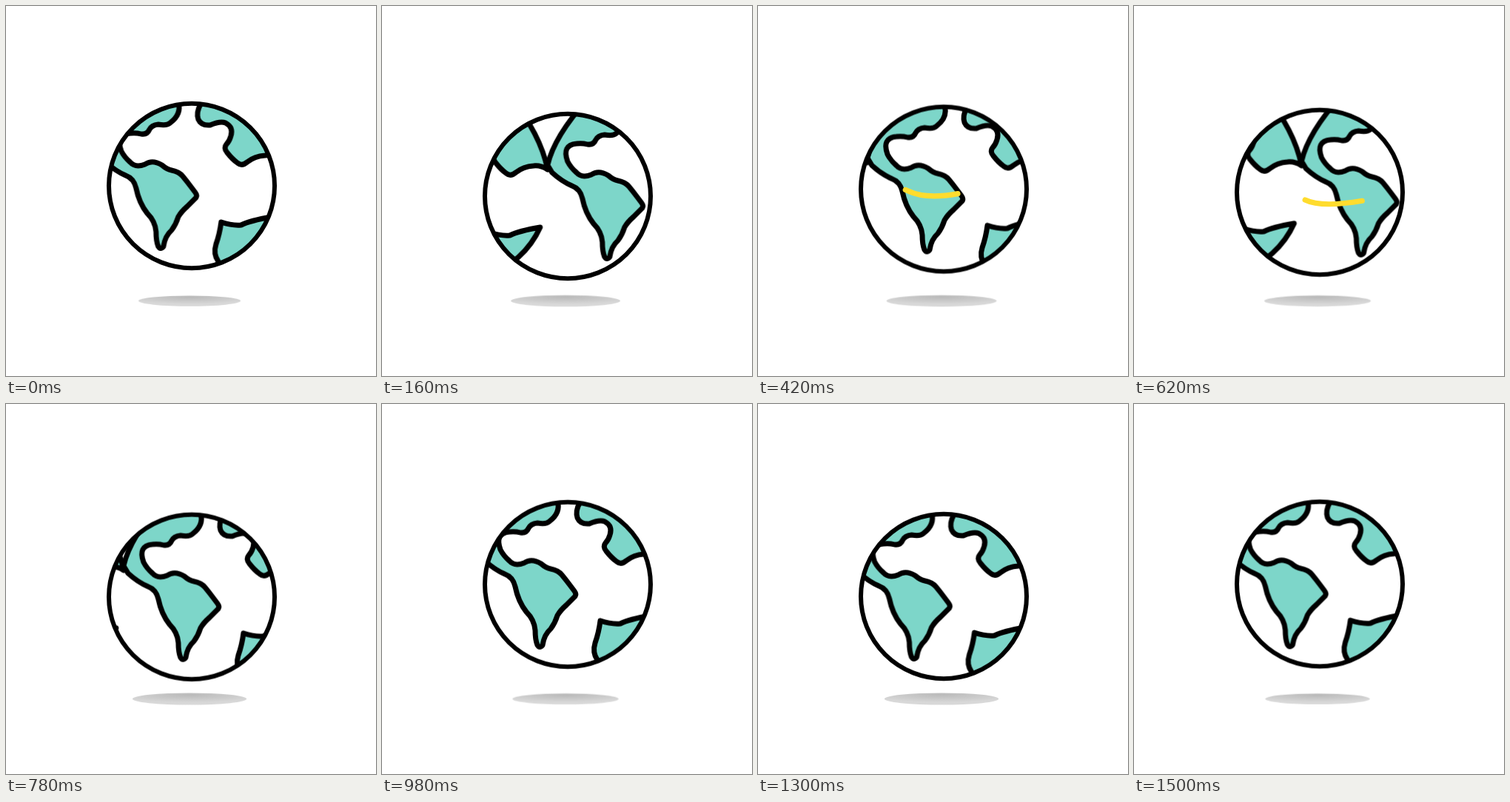
Animation of 500 by 500 pixels, one loop 1520 ms. Source, as an HTML page without scripts:

```html
<!DOCTYPE html>
<html lang="en">
<head>
<meta charset="utf-8">
<title>Spinning globe</title>
<style>
  :root { --loop: 1520ms; --bounce: calc(1520ms / 3); --soft: cubic-bezier(.33, 0, .67, 1); }
  html, body { margin: 0; width: 100%; height: 100%; overflow: hidden; background: #fff; }
  svg { display: block; width: 100vw; height: 100vh; }

  .globe { animation: bob var(--bounce) var(--soft) infinite; }
  .shadow { transform-box: fill-box; transform-origin: center; animation: spread var(--bounce) var(--soft) infinite; }
  .strip { animation: spin var(--loop) infinite; }
  .land { fill: #7dd6c9; stroke: #000; stroke-width: 7; stroke-linejoin: round; }
  .rim { fill: none; stroke: #000; stroke-width: 6; }

  .streak {
    fill: none; stroke: #ffdc2e; stroke-width: 7.2; stroke-linecap: round;
    visibility: hidden; animation: var(--loop) linear infinite;
  }
  .first { stroke-dasharray: 28 200; animation-name: streak-first; }
  .second { stroke-dasharray: 29.5 200; animation-name: streak-second; }

  @keyframes bob {
    0%, 100% { transform: translateY(0); }
    47% { transform: translateY(18.6px); }
  }
  @keyframes spread {
    0%, 100% { transform: scale(.894); }
    56% { transform: scale(1); animation-timing-function: cubic-bezier(.4, 0, .8, .45); }
  }
  /* three turns: quick start, long settle, short rest */
  @keyframes spin {
    0% { transform: translateX(0); animation-timing-function: cubic-bezier(.333, .093, .667, .53); }
    10.526% { transform: translateX(-144px); animation-timing-function: cubic-bezier(.333, .348, .667, .723); }
    27.632% { transform: translateX(-460px); animation-timing-function: cubic-bezier(.333, .418, .667, .752); }
    40.789% { transform: translateX(-622px); animation-timing-function: cubic-bezier(.333, .758, .667, .98); }
    64.474% { transform: translateX(-716px); animation-timing-function: cubic-bezier(.33, .6, .67, 1); }
    85.526%, 98.684% { transform: translateX(-718.5px); animation-timing-function: linear; }
    100% { transform: translateX(-720px); }
  }
  @keyframes streak-first {
    0%, 20.78% { visibility: hidden; stroke-dashoffset: 30; }
    20.79% { visibility: visible; stroke-dashoffset: 30; }
    33.94% { visibility: visible; stroke-dashoffset: -102; }
    33.95%, 100% { visibility: hidden; stroke-dashoffset: -102; }
  }
  @keyframes streak-second {
    0%, 35.85% { visibility: hidden; stroke-dashoffset: 33; }
    35.86% { visibility: visible; stroke-dashoffset: 33; }
    46.71% { visibility: visible; stroke-dashoffset: -102; }
    46.72%, 100% { visibility: hidden; stroke-dashoffset: -102; }
  }
</style>
</head>
<body>
<svg viewBox="0 0 500 500">
  <defs>
    <clipPath id="disc"><ellipse cx="251" cy="243" rx="112" ry="111.2"/></clipPath>
    <radialGradient id="shade" cy=".15" r=".65">
      <stop offset="0" stop-color="#bababa"/>
      <stop offset="1" stop-color="#d8d8d8"/>
    </radialGradient>
    <g id="lands" class="land">
      <!-- Americas -->
      <path d="M183 112 Q138 162 129 201 L135 211 Q148 223 162 229 Q173 233 176 246
        Q180 266 191 280 Q202 291 203 305 Q203 318 206 325 Q209 330 213 325
        Q215 311 224 303 Q230 295 233 285 Q237 278 245 271 L257 259 Q259 256 256 252
        L250 244 Q244 236 239 230 Q234 224 224 222 Q218 221 211 215 Q198 207 188 214
        Q175 219 168 211 Q160 204 156 196 Q148 174 168 172 Q176 171 183 173
        Q191 174 194 167 Q197 161 206 160 Q218 162 222 158 Q238 146 233 130 V112 Z"/>
      <!-- Europe and north Africa -->
      <path d="M263 112 V133 Q257 144 260 153 Q264 162 276 161 Q290 155 297 158
        Q308 164 304 176 Q302 183 298 187 Q294 192 299 198 Q306 207 313 212
        Q319 217 326 211 Q336 203 350 202 Q360 201 369 207 Q359 158 320 112 Z"/>
      <!-- southern land -->
      <path d="M291 292 Q306 297 318 296 Q330 290 359 285 A120 120 0 0 1 287 350
        L287 345 Q280 335 284 322 Q289 308 291 292 Z"/>
    </g>
  </defs>

  <ellipse class="shadow" cx="248" cy="398.5" rx="77.2" ry="8" fill="url(#shade)"/>

  <g class="globe">
    <g clip-path="url(#disc)">
      <g class="strip">
        <use href="#lands"/>
        <use href="#lands" x="240"/>
        <use href="#lands" x="480"/>
        <use href="#lands" x="720"/>
      </g>
    </g>
    <ellipse class="rim" cx="251" cy="243" rx="112" ry="111.2"/>
  </g>

  <path class="streak first" pathLength="100" d="M369 232 Q320 247 273 253 Q228 262 203 250 Q150 228 126 208"/>
  <path class="streak second" pathLength="100" d="M384 248 Q350 258 310 263 Q253 273 231 262 Q175 240 134 212"/>
</svg>
</body>
</html>
```
